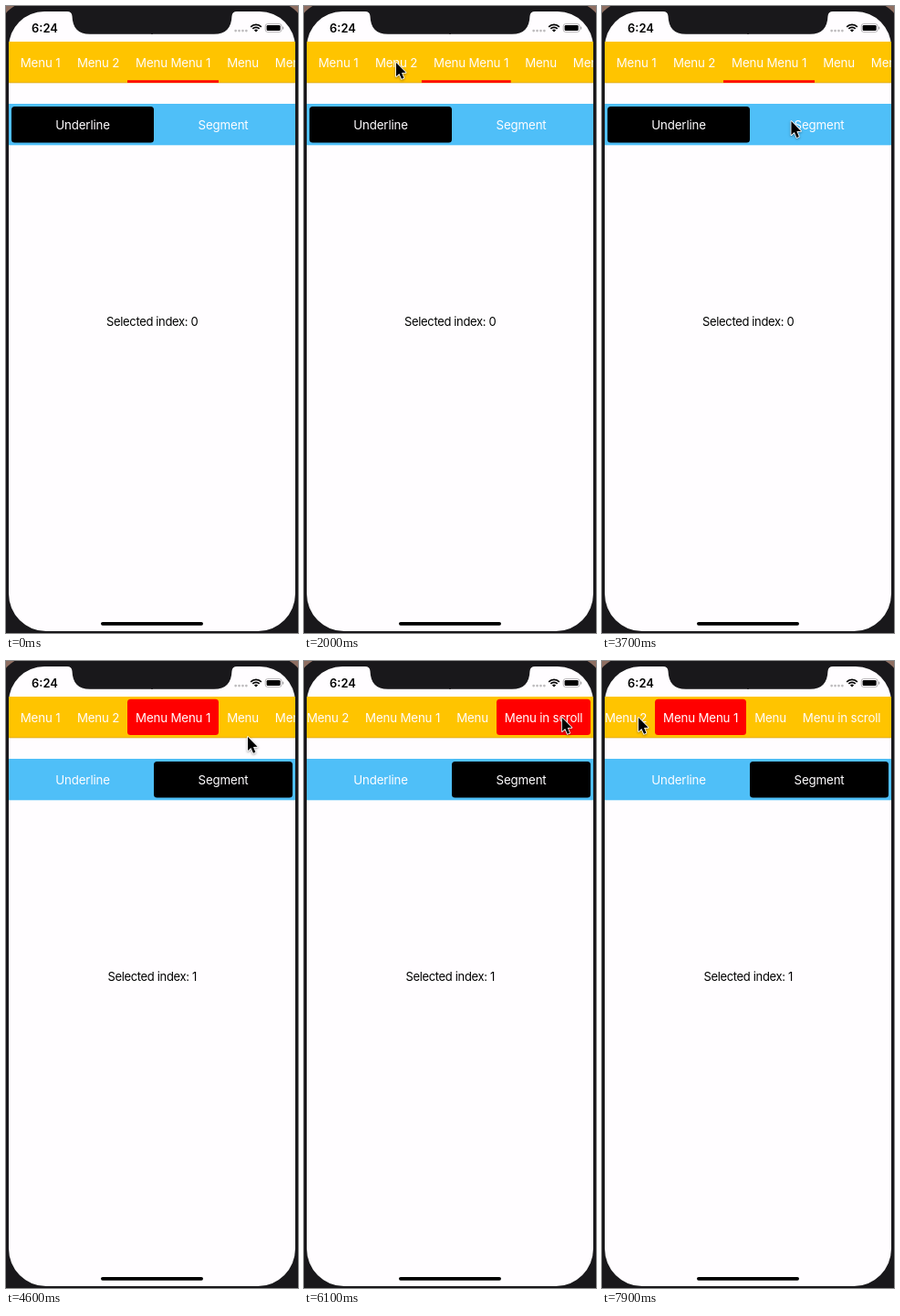
Recreate the animation shown at these times as an HTML page with a canvas. Size 320 px wide and 686 px high, loop 8000 ms.

```html
<!DOCTYPE html>
<html lang="en">
<head>
<meta charset="utf-8">
<title>Segmented menu</title>
<style>
  html, body { margin: 0; width: 100%; height: 100%; overflow: hidden; background: #19181b; }
  canvas { display: block; width: 320px; height: 686px; }
</style>
</head>
<body>
<canvas id="stage"></canvas>
<script>
const W = 320, H = 686, LOOP = 8000;
const canvas = document.getElementById('stage');
const ctx = canvas.getContext('2d');
const ratio = window.devicePixelRatio || 1;
canvas.width = W * ratio;
canvas.height = H * ratio;

const FONT = 'Inter, Roboto, sans-serif';
const WHITE = '#fffdff', DARK = '#19181b';
const SLIDE = 300, SCROLL = 75;

// Lays cells side by side from the left margin
function row(y, cells) {
  let x = 6;
  return cells.map(([label, w]) => {
    const cell = { label, x, w, y };
    x += w;
    return cell;
  });
}
const MENU = row(62, [['Menu 1', 63], ['Menu 2', 64], ['Menu Menu 1', 100],
                      ['Menu', 53], ['Menu in scroll', 103]]);
const SEGMENTS = row(126.5, [['Underline', 156], ['Segment', 152]]);
const [one, two, long, short, last] = MENU;

// Pointer stops; aim is the fraction of the cell's width where it lands
const tap = (time, cell, aim = 0.5) => ({ time, cell, x: cell.x + aim * cell.w, y: cell.y });
const styleTap = tap(3880, SEGMENTS[1], 0.3);
const scrollTap = tap(5480, last, 0.12);
const later = (...args) => {
  const stop = tap(...args);
  return { ...stop, x: stop.x - SCROLL };
};
const STOPS = [
  { time: 0, x: 325, y: 400 },
  tap(900, one), tap(1540, long), tap(1955, two), tap(2420, one), tap(3018, long),
  styleTap, { time: 4530, x: 265, y: 83 },
  tap(4860, short), scrollTap, later(6750, short), later(7430, long, 0.68), later(8130, two, 0.6)
];
const MENU_TAPS = STOPS.filter(s => MENU.includes(s.cell));
const LEAD = 150, REST = 100, TRAVEL = 650;

const mix = (a, b, p) => a + (b - a) * p;
const ease = p => p * p * (3 - 2 * p);
const progress = (t, start, span = SLIDE) =>
  ease(Math.min(1, Math.max(0, (t - start) / span)));

function rect(x, y, w, h, color) {
  ctx.fillStyle = color;
  ctx.fillRect(x, y, w, h);
}

function round(x, y, w, h, r, color) {
  ctx.beginPath();
  ctx.roundRect(x, y, w, h, r);
  ctx.fillStyle = color;
  ctx.fill();
}

function text(str, x, y, color, { size = 13.3, weight = 400, track = -0.16 } = {}) {
  ctx.font = `${weight} ${size}px ${FONT}`;
  ctx.letterSpacing = track + 'px';
  ctx.textAlign = 'center';
  ctx.fillStyle = color;
  ctx.fillText(str, x - track / 2, y);
}

function labels(cells, baseline) {
  for (const { label, x, w } of cells) text(label, x + w / 2, baseline, WHITE);
}

function marker(from, to, p) {
  return [mix(from.x, to.x, p), mix(from.w, to.w, p)];
}

function drawPhone() {
  rect(0, 0, W, H, '#8f6f62');
  round(-11, -6, 342, 740, 42, DARK);
  round(3, 6, 314, 678, [39, 39, 41, 41], WHITE);

  // Notch, mirrored around the middle
  ctx.fillStyle = DARK;
  for (const side of [-1, 1]) {
    const at = x => 160 + side * x;
    ctx.beginPath();
    ctx.moveTo(160, 5);
    ctx.lineTo(at(93), 5);
    ctx.lineTo(at(93), 6);
    ctx.quadraticCurveTo(at(88), 6, at(87.5), 11);
    ctx.bezierCurveTo(at(87), 24, at(81), 30.8, at(68), 30.8);
    ctx.lineTo(160 - side, 30.8);
    ctx.lineTo(160 - side, 5);
    ctx.fill();
  }

  round(104, 674, 112, 3.7, 1.85, '#000');
}

function drawStatus() {
  text('6:24', 42.5, 28.6, '#000', { size: 12.9, weight: 600, track: 0 });

  for (let i = 0; i < 4; i++) round(250.3 + i * 3.9, 25.7, 2.7, 2.7, 1.35, '#bdbbbd');

  // Wifi: a wedge and two arcs
  const fan = r => ctx.arc(274, 28.6, r, -Math.PI * 0.75, -Math.PI * 0.25);
  ctx.strokeStyle = ctx.fillStyle = '#000';
  ctx.lineWidth = 1.8;
  for (const r of [5.2, 8.2]) {
    ctx.beginPath();
    fan(r);
    ctx.stroke();
  }
  ctx.beginPath();
  ctx.moveTo(274, 28.6);
  fan(2.9);
  ctx.fill();

  ctx.beginPath();
  ctx.roundRect(284.2, 19.6, 17.8, 8.8, 2.4);
  ctx.lineWidth = 0.8;
  ctx.strokeStyle = '#a5a3a5';
  ctx.stroke();
  round(285.6, 21, 15, 6, 1.3, '#000');
  round(303, 22.5, 1.2, 3, 0.6, '#a5a3a5');
}

function drawMenu(t) {
  const done = MENU_TAPS.filter(s => s.time <= t);
  const now = done.at(-1), before = done.at(-2);
  const to = now ? now.cell : long;
  const from = before ? before.cell : long;
  const [x, w] = marker(from, to, now ? progress(t, now.time) : 1);

  rect(3, 39, 314, 45, '#ffc400');
  rect(3, 83.5, 314, 0.8, '#d9a81c');
  ctx.save();
  ctx.beginPath();
  ctx.rect(3, 39, 314, 46);
  ctx.clip();
  ctx.translate(-SCROLL * progress(t, scrollTap.time), 0);
  if (t < styleTap.time) rect(x, 81.2, w, 2.8, '#ff0a00');
  else round(x, 41.8, w, 39.2, 3.5, '#ff0000');
  labels(MENU, 66.7);
  ctx.restore();
}

function drawSegments(t) {
  const [x, w] = marker(...SEGMENTS, progress(t, styleTap.time));
  rect(3, 107, 314, 45.3, '#4fbff8');
  round(x, 110, w, 39.5, 3.5, '#000');
  labels(SEGMENTS, 134.8);
  const index = t < styleTap.time ? 0 : 1;
  text('Selected index: ' + index, 160, 349.6, '#000', { size: 13, track: -0.35 });
}

function pointerAt(t) {
  let pos = STOPS[0];
  STOPS.slice(1).forEach((stop, i) => {
    const arrive = stop.time - LEAD;
    const leave = Math.max(STOPS[i].time + REST, arrive - TRAVEL);
    const p = progress(t, leave, arrive - leave);
    pos = { x: mix(pos.x, stop.x, p), y: mix(pos.y, stop.y, p) };
  });
  return pos;
}

function drawPointer(t) {
  const { x, y } = pointerAt(t);
  ctx.save();
  ctx.translate(x, y);
  ctx.beginPath();
  ctx.moveTo(0, 0);
  ctx.lineTo(0, 15);
  ctx.lineTo(3.4, 11.9);
  ctx.lineTo(6, 17.8);
  ctx.lineTo(8.4, 16.8);
  ctx.lineTo(6, 11);
  ctx.lineTo(10.6, 10.8);
  ctx.closePath();
  ctx.lineJoin = 'round';
  ctx.lineWidth = 1.7;
  ctx.strokeStyle = '#fff';
  ctx.shadowColor = 'rgba(0,0,0,.4)';
  ctx.shadowBlur = 2.5 * ratio;
  ctx.shadowOffsetY = ratio;
  ctx.stroke();
  ctx.shadowColor = 'transparent';
  ctx.fillStyle = '#000';
  ctx.fill();
  ctx.restore();
}

function draw(t) {
  ctx.setTransform(ratio, 0, 0, ratio, 0, 0);
  drawPhone();
  drawStatus();
  drawMenu(t);
  drawSegments(t);
  drawPointer(t);
}

function tick() {
  draw(performance.now() % LOOP);
  requestAnimationFrame(tick);
}
tick();
</script>
</body>
</html>
```
